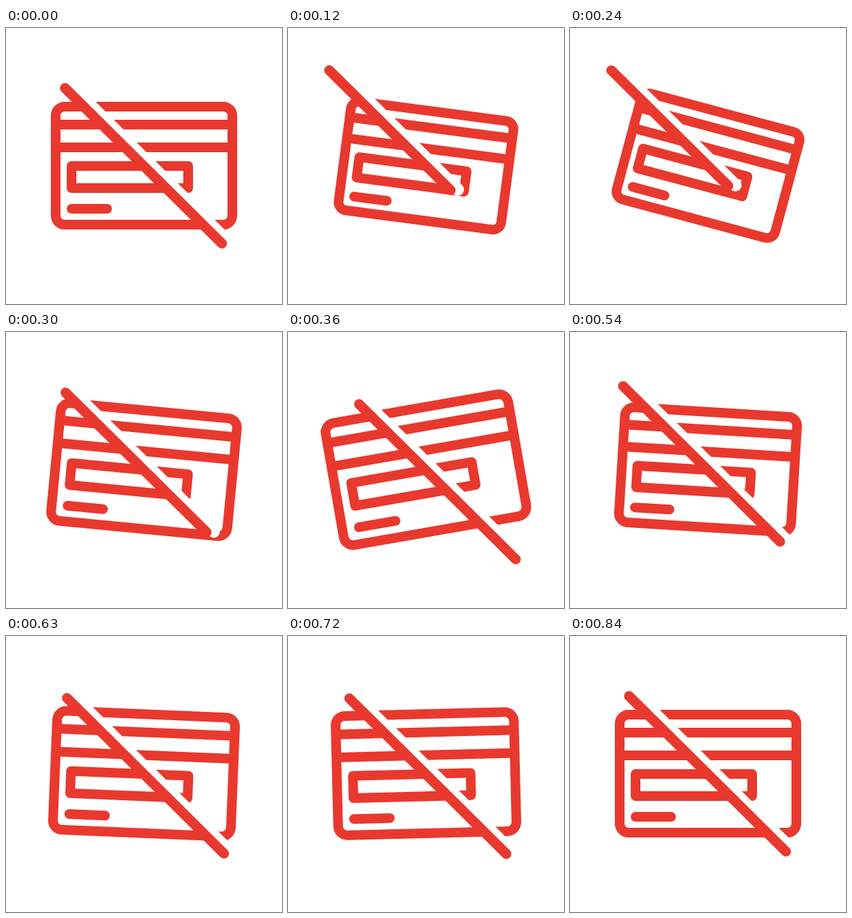
Animation, 400 px wide and 400 px high, one loop 2870 ms. Source, as an HTML page with a canvas:

```html
<!DOCTYPE html>
<html lang="en">
<head>
<meta charset="utf-8">
<title>Card declined</title>
<style>
html, body { margin: 0; width: 100%; height: 100%; overflow: hidden; background: #fff; }
canvas { display: block; width: 400px; height: 400px; }
</style>
</head>
<body>
<canvas id="stage" width="400" height="400"></canvas>
<script>
const ctx = document.getElementById('stage').getContext('2d');
const RED = '#e9392e';
const LOOP = 2870, STEP = 30, END = 840;
const CX = 200, CY = 199.7;

const ease = u => (1 - Math.cos(Math.PI * u)) / 2;

// Swings from rest to each peak in turn, then back to rest at END.
function swing(t, times, peaks) {
  let from = 0, begin = 0;
  for (let i = 0; i <= times.length; i++) {
    const to = peaks[i] ?? 0, end = times[i] ?? END;
    if (t <= end) return from + (to - from) * ease((t - begin) / (end - begin));
    from = to;
    begin = end;
  }
  return 0;
}

// Each swing is half the last; the tail end recoils further on the first one.
const slide = (t, recoil) => swing(t, [187, 370, 525, 660], [-36 * recoil, 18, -9, 4.5]);
const tilt = t => swing(t, [240, 390, 575, 700], [15, -12.5, 5, -1.5]);

function line(x1, y1, x2, y2) {
  ctx.beginPath();
  ctx.moveTo(x1, y1);
  ctx.lineTo(x2, y2);
  ctx.stroke();
}

function drawCard(angle, scale) {
  ctx.save();
  ctx.translate(CX, CY);
  ctx.rotate(angle * Math.PI / 180);
  ctx.scale(scale, scale);
  ctx.translate(-CX, -CY);
  ctx.strokeStyle = RED;
  ctx.lineWidth = 14 / scale; // the outline keeps its weight
  ctx.beginPath();
  ctx.roundRect(72, 114, 256, 171, 13);
  ctx.stroke();
  ctx.lineCap = 'butt';
  line(72, 140, 328, 140);
  line(72, 173, 328, 173);
  ctx.lineCap = ctx.lineJoin = 'round';
  ctx.strokeRect(95, 200, 169, 32);
  line(95, 262, 146.5, 262);
  ctx.restore();
}

function drawSlash(head, tail) {
  const x1 = 85.5 + head, y1 = 87 + head, x2 = 313 + tail, y2 = 312.4 + tail;
  ctx.lineCap = 'round';
  ctx.strokeStyle = '#fff';
  ctx.lineWidth = 18;
  line(x1 + 10.4, y1 - 1, x2 + 10.4, y2 - 1);
  ctx.strokeStyle = RED;
  ctx.lineWidth = 14.5;
  line(x1, y1, x2, y2);
}

function draw(now) {
  const t = Math.min(Math.floor((now % LOOP) / STEP) * STEP, END);
  const head = slide(t, 1);
  ctx.fillStyle = '#fff';
  ctx.fillRect(0, 0, 400, 400);
  drawCard(tilt(t), 1 + head / 360);
  drawSlash(head, slide(t, 3));
}

let start;
function tick(now) {
  start ??= now;
  draw(now - start);
  requestAnimationFrame(tick);
}
draw(0);
requestAnimationFrame(tick);
</script>
</body>
</html>
```
